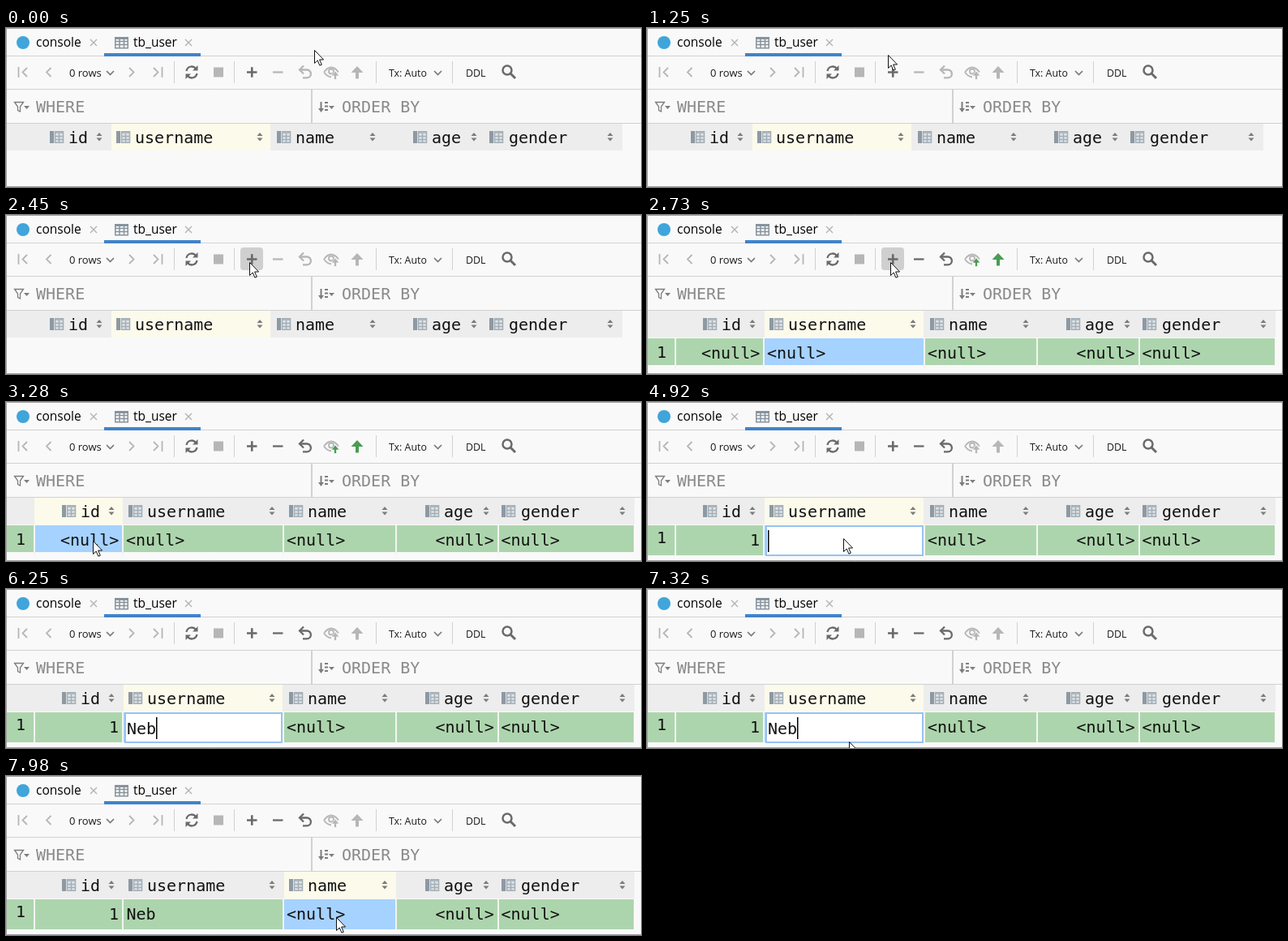
These frames come from a looping animation (783 px wide and 196 px high, 8 s). An HTML page:

```html
<!DOCTYPE html>
<html lang="en">
<head>
<meta charset="utf-8">
<title>Table editor</title>
<style>
html, body { margin: 0; width: 100%; height: 100%; overflow: hidden; background: #f9f9f9; }
svg { display: block; width: 783px; height: 196px; }
text { white-space: pre; }
.ui { font-family: "Open Sans", "Noto Sans", sans-serif; font-size: 12.4px; fill: #1a1a1a; }
.tab { font-size: 15.5px; fill: #000; }
.mono { font-family: "DejaVu Sans Mono", "Noto Sans Mono", monospace; font-size: 20px; fill: #111; }
.hint { fill: #8a8a8a; }
.line { fill: none; stroke: #d1d1d1; }
.ico { fill: none; stroke: currentColor; }
.solid { fill: currentColor; stroke: none; }
.off { color: #b6b6b6; }
.on { color: #6a6a6a; }

/* Every change is a hard cut inside one 8 s loop. */
.a { animation: 8s step-end infinite; }
.pointer { animation-name: pointer; }
.hover { animation-name: hover; }
.tip { animation-name: tip; }
.head { animation-name: head; }
.row { animation-name: row; }
.tall { animation-name: tall; }
.focus { animation-name: focus; }
.focus.tall { animation-name: focus, tall; }
.number { animation-name: number; }
.edit { animation-name: edit; }
.caret { animation-name: caret; }
.enable { animation-name: enable; }
.submit { animation-name: submit; }
.id-null { animation-name: idNull; }
.id-typed { animation-name: idTyped; }
.id-set { animation-name: idSet; }
.user-null { animation-name: userNull; }
.user-set { animation-name: userSet; }
.k1 { animation-name: key1; }
.k2 { animation-name: key2; }
.k3 { animation-name: key3; }

@keyframes pointer {
  0% { transform: translate(380px, 27px); visibility: visible; }
  1.5% { transform: translate(369px, 25px); }
  3.375% { transform: translate(357px, 26px); }
  4.875% { transform: translate(344px, 27px); }
  6.375% { transform: translate(333px, 38px); }
  7.875% { transform: translate(325px, 52px); }
  9.375% { transform: translate(318px, 62px); }
  10.875% { transform: translate(311px, 66px); }
  12.375% { transform: translate(305px, 68px); }
  13.875% { transform: translate(292px, 49px); }
  15.625% { transform: translate(297px, 33px); }
  17.5% { transform: translate(306px, 50px); }
  19% { transform: translate(308px, 58px); }
  22.5% { transform: translate(300px, 58px); }
  36% { transform: translate(182px, 96px); }
  37.5% { transform: translate(107px, 171px); }
  51.75% { transform: translate(127px, 171px); }
  53.625% { transform: translate(116px, 173px); }
  55.125% { transform: translate(190px, 168px); }
  56.625% { transform: translate(242px, 168px); visibility: visible; }
  69.875% { transform: translate(242px, 168px); visibility: hidden; }
  88.5% { transform: translate(432px, 186px); visibility: visible; }
  90% { transform: translate(335px, 190px); }
  91.5% { transform: translate(249px, 188px); }
  93.375% { transform: translate(245px, 185px); }
  94.875% { transform: translate(232px, 181px); }
  96.75% { transform: translate(320px, 176px); }
  98.25%, 100% { transform: translate(407px, 174px); visibility: visible; }
}
@keyframes hover {
  0%, 15.625%, 36%, 100% { fill: #f9f9f9; }
  12.375% { fill: #dfdfdf; }
  17.5% { fill: #cfcfcf; }
}
@keyframes tip { 0%, 30.625%, 100% { visibility: hidden; } 24% { visibility: visible; } }
@keyframes head { 0% { transform: none; } 34.125%, 100% { transform: translate(15px, 0); } }
@keyframes row { 0% { opacity: 0; } 34.125%, 100% { opacity: 1; } }
@keyframes tall { 0% { height: 33px; } 61.5%, 100% { height: 37px; } }
@keyframes number { 0% { transform: none; } 61.5%, 100% { transform: translate(0, -2px); } }
@keyframes focus {
  0%, 58.375% { x: 130px; width: 196px; }
  41% { x: 20px; width: 109px; }
  99.75%, 100% { x: 328px; width: 138px; }
}
@keyframes edit {
  0%, 58.375%, 99.75%, 100% { visibility: hidden; x: 36px; width: 107px; height: 31px; }
  42.875% { visibility: visible; x: 36px; width: 107px; height: 31px; }
  61.5% { visibility: visible; x: 147px; width: 193px; height: 36px; }
}
@keyframes caret {
  0%, 58.375%, 87%, 99.75%, 100% { visibility: hidden; x: 39px; }
  42.875% { visibility: visible; x: 39px; }
  51.75% { visibility: visible; x: 51px; }
  61.5% { visibility: visible; x: 149px; }
  69.875% { visibility: visible; x: 161px; }
  75% { visibility: visible; x: 173px; }
  78.125%, 90% { visibility: visible; x: 185px; }
}
@keyframes enable { 0% { color: #b6b6b6; } 34.125%, 100% { color: #6a6a6a; } }
@keyframes submit { 0%, 46.375%, 100% { color: #b6b6b6; } 34.125% { color: #499c54; } }
@keyframes idNull { 0% { visibility: visible; } 42.875%, 100% { visibility: hidden; } }
@keyframes idTyped { 0%, 58.375%, 100% { visibility: hidden; } 51.75% { visibility: visible; } }
@keyframes idSet { 0% { visibility: hidden; } 58.375%, 100% { visibility: visible; } }
@keyframes userNull { 0% { visibility: visible; } 61.5%, 100% { visibility: hidden; } }
@keyframes userSet { 0% { visibility: hidden; } 99.75%, 100% { visibility: visible; } }
@keyframes key1 { 0%, 99.75%, 100% { visibility: hidden; } 69.875% { visibility: visible; } }
@keyframes key2 { 0%, 99.75%, 100% { visibility: hidden; } 75% { visibility: visible; } }
@keyframes key3 { 0%, 99.75%, 100% { visibility: hidden; } 78.125% { visibility: visible; } }
</style>
</head>
<body>
<svg viewBox="0 0 783 196">
  <defs>
    <g id="col">
      <path d="M0 0h5v15h-5z" fill="#8d99a3"/>
      <path d="M6.5 .75h10v13.5h-10z" fill="#dfe3e6" stroke="#a3aeb7" stroke-width="1.5"/>
      <path d="M6 2h11M6 6.5h11M6 10.5h11M11.5 3v11" stroke="#a3aeb7" stroke-width="1.5"/>
    </g>
    <path id="sort" d="M0 4L3.5 0L7 4zM0 6.5h7L3.5 10.5z" fill="#7b7b7b"/>
    <path id="close" d="M0 0l8 8M8 0l-8 8" stroke="#b3b3b3" stroke-width="1.4"/>
    <path id="down" d="M0 0l4.5 4.5L9 0" fill="none" stroke="#7a7a7a" stroke-width="1.7"/>
    <path id="gap" d="M0 152v37" stroke="#f1f5f1" stroke-width="2"/>
  </defs>

  <rect width="783" height="196" fill="#f9f9f9"/>

  <!-- tabs -->
  <path class="line" d="M0 34.5h783"/>
  <circle cx="21" cy="18" r="8" fill="#3fa5da"/>
  <text class="ui tab" x="37" y="23">console</text>
  <use href="#close" x="104" y="14"/>
  <g fill="none" stroke="#87939d" stroke-width="1.5">
    <path d="M134.75 11.75h15.5v13h-15.5zM134 16.5h17M134 20.5h17M140 13v12M145.5 13v12"/>
    <path d="M134 12.5h17" stroke-width="3"/>
  </g>
  <text class="ui tab" x="157" y="23">tb_user</text>
  <use href="#close" x="221" y="14"/>
  <rect x="121" y="31" width="119" height="4" fill="#4083c9"/>

  <!-- toolbar -->
  <path class="line" d="M207.5 41v27M281.5 41v27M456.5 41v27M550.5 41v27"/>
  <g class="ico off" stroke-width="1.8">
    <path d="M15.5 48v13M26 49l-5.5 5.5L26 60M55.5 49L50 54.5l5.5 5.5M152 49l5.5 5.5L152 60M182 49l5.5 5.5L182 60M192.5 48v13"/>
    <path class="solid" d="M256 48.5h12v12h-12z"/>
  </g>
  <text class="ui" x="78" y="59.5" style="font-size:13px">0 rows</text>
  <use href="#down" x="124" y="53"/>
  <g class="ico on" stroke-width="2.3">
    <path d="M222.5 53a6.5 6.5 0 0 1 11.5-3M235.5 56a6.5 6.5 0 0 1-11.5 3"/>
    <path class="solid" d="M236.500 46v6.500h-6.500zM221.500 63v-6.500h6.500z"/>
  </g>
  <rect class="a hover" x="289" y="40" width="28" height="28" rx="4" fill="#f9f9f9"/>
  <path class="ico on" d="M297 54.5h12.5M303.25 48.25v12.5" stroke-width="2.6"/>
  <g class="ico a enable" stroke-width="2.3">
    <path d="M329 54.5h12.5"/>
    <path d="M363 51.5h8a4.9 4.9 0 0 1 0 9.8h-5"/>
    <path d="M367 46.500l-5 5l5 5"/>
  </g>
  <g class="ico off" stroke-width="1.8">
    <path d="M392 54.5q9-12 18 0M392 54.5q4 5.5 9 6"/>
    <circle cx="401" cy="53.5" r="3"/>
  </g>
  <g class="a submit" fill="currentColor">
    <path d="M406 53l5 6h-3.5v4.5h-3v-4.5h-3.5z" stroke="#f9f9f9" stroke-width=".7"/>
    <path d="M433 47l7.5 8h-5.5v7.5h-4v-7.5h-5.5z"/>
  </g>
  <text class="ui" x="472" y="59.5">Tx: Auto</text>
  <use href="#down" x="528" y="53"/>
  <text class="ui" x="567" y="59.5">DDL</text>
  <g class="ico on">
    <circle cx="618" cy="52" r="5.5" stroke-width="2.5"/>
    <path d="M622 56l6 6" stroke-width="3"/>
  </g>

  <!-- filter row -->
  <path class="line" d="M0 75.5h783M0 117.5h783"/>
  <path class="line" d="M377 75v42" stroke-width="2"/>
  <path d="M10.5 91.5h11l-4 5.5v6l-3-1.5v-4.5z" fill="none" stroke="#7d7d7d" stroke-width="1.3"/>
  <path d="M22 96h7l-3.5 4z" fill="#7d7d7d"/>
  <text class="mono hint" x="37" y="104">WHERE</text>
  <path d="M388.5 91v9M393 92h4M393 96.5h4M393 101h4" fill="none" stroke="#7d7d7d" stroke-width="2"/>
  <path d="M385 99h7l-3.5 5zM398 96h7l-3.5 4z" fill="#7d7d7d"/>
  <text class="mono hint" x="414" y="104">ORDER BY</text>

  <!-- column heads -->
  <g class="a head">
    <rect x="-15" y="118" width="775" height="33" fill="#ededed"/>
    <rect class="a focus" x="130" y="118" width="196" height="33" fill="#fcfaeb"/>
    <use href="#col" x="54" y="127"/>
    <use href="#col" x="136" y="127"/>
    <use href="#col" x="334" y="127"/>
    <use href="#col" x="502" y="127"/>
    <use href="#col" x="596" y="127"/>
    <g class="mono">
      <text x="77" y="142">id</text>
      <text x="159" y="142">username</text>
      <text x="357" y="142">name</text>
      <text x="525" y="142">age</text>
      <text x="620" y="142">gender</text>
    </g>
    <use href="#sort" x="111.5" y="129"/>
    <use href="#sort" x="309.5" y="129"/>
    <use href="#sort" x="448.5" y="129"/>
    <use href="#sort" x="573.5" y="129"/>
    <use href="#sort" x="741.5" y="129"/>
  </g>

  <!-- record -->
  <g class="a row">
    <rect class="a tall" x="1" y="152" width="773" height="33" fill="#add5ad"/>
    <rect class="a focus tall" x="130" y="152" width="196" height="33" fill="#a6d2ff" transform="translate(15 0)"/>
    <use href="#gap" x="35"/>
    <use href="#gap" x="144"/>
    <use href="#gap" x="342"/>
    <use href="#gap" x="481"/>
    <use href="#gap" x="607"/>
    <g class="mono">
      <text class="a number" x="12" y="176">1</text>
      <text class="a id-null" x="67" y="177">&lt;null&gt;</text>
      <text class="a id-set" x="127" y="177">1</text>
      <text class="a user-null" x="148" y="177">&lt;null&gt;</text>
      <text class="a user-set" x="148.5" y="177">Neb</text>
      <text x="346" y="177">&lt;null&gt;</text>
      <text x="529.5" y="177">&lt;null&gt;</text>
      <text x="610.5" y="177">&lt;null&gt;</text>
    </g>
  </g>

  <!-- cell editor -->
  <rect class="a edit" x="147" y="153" width="193" height="36" fill="#fff" stroke="#97c3f3" stroke-width="2"/>
  <g class="mono">
    <text class="a id-typed" x="39" y="178">1</text>
    <text class="a k1" x="149" y="179">N</text>
    <text class="a k2" x="161" y="179">e</text>
    <text class="a k3" x="173" y="179">b</text>
  </g>
  <rect class="a caret" x="149" y="158" width="1.5" height="27"/>

  <!-- tooltip -->
  <g class="a tip">
    <rect x="306.5" y="76.5" width="176" height="26" fill="#f7f7f7" stroke="#adadad"/>
    <text class="ui" x="316" y="94">Add New Row</text>
    <text class="ui hint" x="412" y="94">Alt+Insert</text>
  </g>

  <path d="M783 .5H.5v195H783" fill="none" stroke="#a0a0a0"/>
  <path class="a pointer" d="M.5 .5v16l3.7-3.5 2.7 6.2 2.4-1-2.7-6.2h5z" fill="#fff" stroke="#111"/>
</svg>
</body>
</html>
```
